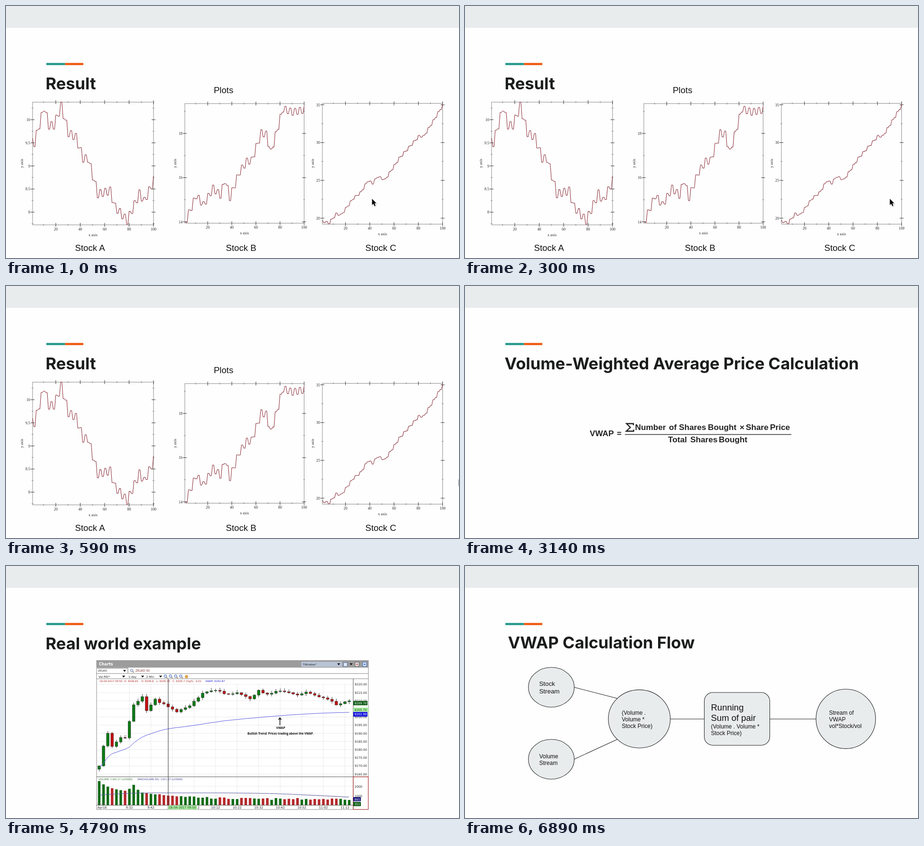
Animation of 955x532 px, one loop 8000 ms. Source, as an HTML page:

```html
<!DOCTYPE html>
<html lang="en">
<head>
<meta charset="utf-8">
<title>Stock slides</title>
<style>
  html, body { margin: 0; width: 100%; height: 100%; overflow: hidden; background: #fefefe; }
  svg { display: block; width: 955px; height: 532px; }
  .title { font: 700 34.5px Inter, sans-serif; fill: #1b1c1c; }
  .sans { font-family: "Liberation Sans", sans-serif; fill: #111; }
  .serif { font-family: "Liberation Serif", serif; fill: #222; }
  .ui { font-family: "DejaVu Sans", sans-serif; }
  .formula { font: 700 17.2px "Liberation Sans", sans-serif; fill: #222; }
  .note { font-family: "Open Sans", sans-serif; font-weight: 700; fill: #111; text-anchor: middle; }
</style>
</head>
<body>
<svg id="stage" viewBox="0 0 955 532"></svg>
<script>
const NS = "http://www.w3.org/2000/svg";
const stage = document.getElementById("stage");

function add(parent, tag, attrs, content) {
  const node = document.createElementNS(NS, tag);
  for (const key in attrs) node.setAttribute(key, attrs[key]);
  if (content !== undefined) node.textContent = content;
  parent.appendChild(node);
  return node;
}
const group = parent => add(parent, "g", {});
const rect = (g, x, y, width, height, fill, more) => add(g, "rect", { x, y, width, height, fill, ...more });
const path = (g, d, stroke, width = 1, more) =>
  add(g, "path", { d, fill: "none", stroke, "stroke-width": width, ...more });
const solid = (g, d, fill) => add(g, "path", { d, fill });
const text = (g, x, y, str, more) => add(g, "text", { x, y, ...more }, str);
const lines = (g, x, y, size, step, rows) =>
  rows.forEach((row, i) => text(g, x, y + i * step, row, { class: "sans", "font-size": size }));

// Straight interpolation through a few [position, value] keys.
const through = keys => v => {
  const i = Math.max(1, keys.findIndex(key => key[0] >= v));
  const [a, ya] = keys[i - 1], [b, yb] = keys[i];
  return ya + (yb - ya) * (v - a) / (b - a);
};

let seed = 7;
const random = () => (seed = seed * 16807 % 2147483647) / 2147483647;

function slide(title, x = 83.5, y = 176) {
  const g = group(stage);
  text(g, x, y, title, { class: "title" });
  return g;
}

rect(stage, 0, 0, 955, 532, "#fefefe");
rect(stage, 0, 0, 955, 46, "#e8ecec");
rect(stage, 85, 120.2, 39.5, 4.6, "#26998b");
rect(stage, 124.5, 120.2, 38.5, 4.6, "#ee5b11");

// ---------- three line plots ----------
// Trend plus an alternating ripple; each value is held for one x unit.
function plot(g, p) {
  const unit = (p.right - p.left) / 99;
  const px = v => p.left + (v - 1) * unit;
  const hTick = (y, r) => `M${p.left - r} ${y}h${2 * r}M${p.right - r} ${y}h${2 * r}`;
  const vTick = (x, r) => `M${x} ${p.top - r}v${2 * r}M${x} ${p.bottom - r}v${2 * r}`;
  const label = (x, y, str, anchor, more) =>
    text(g, x, y, str, { class: "serif", "font-size": 8, "text-anchor": anchor, ...more });
  let ticks = "", minor = "";

  for (let v = 10; v <= 100; v += 10) {
    if (v % 20) { minor += vTick(px(v), 2); continue; }
    ticks += vTick(px(v), 4);
    label(px(v), p.axisY - 12, v, "middle");
  }
  p.labels.forEach((str, i) => {
    const y = p.firstY + i * p.stepY;
    ticks += hTick(y, 4);
    label(p.left - 5, y + 3, str, "end");
  });
  for (let y = p.firstY - p.stepY / 2; y < p.bottom; y += p.stepY)
    if (y > p.top) minor += hTick(y, 2);

  rect(g, p.left, p.top, p.right - p.left, p.bottom - p.top, "none", { stroke: "#8a8a8a" });
  path(g, minor, "#777", 0.8);
  path(g, ticks, "#333", 1);

  const trend = through(p.trend);
  let d = "";
  for (let v = 1; v <= 100; v++) {
    const k = v >> 1;
    const y = trend(k) + (k % 2 ? p.ripple : -p.ripple);
    d += (d ? "L" : "M") + px(v) + " " + Math.min(p.bottom, Math.max(p.top, y));
  }
  path(g, d, "#8c2f3a", 1.05, { "stroke-linejoin": "round" });

  label((p.left + p.right) / 2, p.axisY, "x axis", "middle");
  label(0, 0, "y axis", "middle", { transform: `translate(${p.nameX} 332) rotate(-90)` });
  text(g, p.captionX, 517, p.caption, { class: "sans", "font-size": 18.6 });
}

const plots = slide("Result");
text(plots, 438, 184, "Plots", { class: "sans", "font-size": 18.5 });
plot(plots, {
  left: 56, right: 311, top: 203, bottom: 462, firstY: 240, stepY: 48.8,
  labels: ["10", "9.5", "9", "8.5", "8"],
  axisY: 485.5, nameX: 36, caption: "Stock A", captionX: 145.5, ripple: 8,
  trend: [[0, 287], [1, 289], [5, 214], [7, 252], [9, 252], [12, 211], [15, 268], [18, 277], [21, 322],
    [23, 322], [27, 397], [32, 390], [34, 424], [39, 453], [44, 396], [46, 412], [50, 367]]
});
plot(plots, {
  left: 377, right: 628.5, top: 206, bottom: 458.5, firstY: 269, stepY: 93.3,
  labels: ["18", "16", "14"],
  axisY: 481.5, nameX: 359, caption: "Stock B", captionX: 463.5, ripple: 7,
  trend: [[0, 462], [5, 400], [8, 420], [12, 385], [15, 399], [17, 368], [19, 404], [23, 350], [26, 328],
    [28, 326], [32, 268], [34, 271], [36, 309], [41, 217], [45, 224], [50, 219]]
});
plot(plots, {
  left: 667, right: 920.5, top: 205.5, bottom: 460.5, firstY: 208.5, stepY: 79.8,
  labels: ["35", "30", "25", "20"],
  axisY: 483.5, nameX: 649, caption: "Stock C", captionX: 757.5, ripple: 2,
  trend: [[0, 454], [3, 458], [6, 439], [8, 441], [13, 406], [16, 394], [19, 369], [21, 374], [23, 360],
    [26, 367], [32, 321], [40, 275], [42, 275], [46, 242], [50, 208]]
});

const cursor = group(plots);
const arrow = "M0 0V13.2L3 10.4L5.2 15.4L7.6 14.4L5.4 9.5H9.3Z";
path(cursor, arrow, "#bbb", 2, { transform: "translate(.8 1.2)", opacity: 0.5 });
path(cursor, arrow, "#fff", 2.2);
solid(cursor, arrow, "#0a0a0a");
const sliver = rect(plots, 953.6, 408, 4, 15, "#a5a5a5", { rx: 2 });

// ---------- formula ----------
const formula = slide("Volume-Weighted Average Price Calculation");
[["VWAP", 263, 317], ["=", 320, 317], ["Number", 358.5, 304], ["of", 430, 304], ["Shares", 451, 304],
  ["Bought", 512, 304], ["×", 579, 304], ["Share", 592, 304], ["Price", 643, 304],
  ["Total", 428, 330], ["Shares", 475, 330], ["Bought", 535, 330]
].forEach(([word, x, y]) => text(formula, x, y, word, { class: "formula" }));
path(formula, "M355 294V290.5H340.5L348.5 298.5L340 306.5H355.5V303", "#222", 2.4);
path(formula, "M337 313.5H688", "#333", 1.6);

// ---------- trading chart ----------
const market = slide("Real world example");
const ui = (x, y, str, size, fill = "#222", more) =>
  text(market, x, y, str, { class: "ui", "font-size": size, fill, ...more });
const caret = (x, y) => solid(market, `M${x - 3.2} ${y}h6.4l-3.2 4z`, "#111");

rect(market, 191, 199.5, 573, 314.5, "#fff", { stroke: "#888" });
rect(market, 191, 199.5, 573, 15, "#9c9c9c");
ui(196, 210, "Charts", 8, "#fff", { "font-weight": 700 });
rect(market, 622.5, 202, 86, 11, "#b7c3d3");
ui(626, 209.5, "TWindow*", 5.6);
rect(market, 711.5, 204, 8, 8, "#dfe8f5", { stroke: "#5a78b5" });
rect(market, 736, 203, 8, 9, "#f1f1f1", { stroke: "#555" });
path(market, "M738 207.5h4M740 205v5", "#b33", 1);
rect(market, 752, 203, 8, 9, "#dce8fa", { stroke: "#3b6cc0" });
path(market, "M754 207.5h4", "#3b6cc0", 2);
caret(701.5, 205.5);
caret(727.5, 205.5);

path(market, "M191 227H764M191 238H764", "#777", 0.9);
path(market, "M192 215.5H257V226", "#555", 0.9);
ui(194, 223, "ZELKO", 5.8);
ui(273, 223, "ZELKO 50", 6.2, "#7a2a2a");
ui(195, 235.5, "Vol-RSI*", 6);
ui(258, 235.5, "1-day", 6);
ui(295.5, 235.5, "2-Min", 6);
caret(250, 219.5);
[248, 288, 326].forEach(x => caret(x, 231.5));
function lens(x, y, color) {
  path(market, `M${x + 2} ${y + 2}l2.5 2.5`, "#a8702a", 1.4);
  add(market, "circle", { cx: x, cy: y, r: 2.8, fill: "#d9e7fb", stroke: color });
}
for (let i = 0; i < 4; i++) lens(336 + 10.8 * i, 232.5, "#3f62b0");
lens(265, 220.5, "#7a86a8");
add(market, "circle", { cx: 380.5, cy: 233.5, r: 3.6, fill: "#e0a850" });

[["18-04-2017 09:50", 197], ["O: 9206.65", 249], ["H: 9209.8", 285], ["L: 9205.45", 317],
  ["C: 9205.7", 351], ["Chg%: -0.01", 379], ["VWAP: 9192.87", 420]
].forEach(([str, x], i) => ui(x, 245.3, str, 5.4, i === 6 ? "#2222cc" : "#b02a2a"));

const barX = i => 196.5 + 9.088 * i;
const priceY = i => 250 + 17.2 * i;
let grid = "M191 465H732M191 485.5H732";
for (let i = 0; i < 12; i++) {
  grid += `M191 ${priceY(i)}H732`;
  ui(735, priceY(i) + 2.3, (9220 - 5 * i).toFixed(2), 6.3);
}
for (let i = 7; i < 59; i += 5) grid += `M${barX(i)} 249V505`;
path(market, grid, "#d4d4d4", 0.8, { "stroke-dasharray": "2 1.5" });

const price = through([[-1, 429], [0, 422], [1, 380], [2, 353], [3, 381], [5, 362], [6, 363], [8, 293],
  [10, 277], [11, 305], [13, 282], [18, 308], [21, 294], [24, 269], [27, 262], [30, 272], [32, 267],
  [35, 282], [37, 263], [39, 272], [41, 263], [46, 271], [48, 266], [53, 282], [55, 292], [58, 286]]);
const volume = i => 13 + 17 * Math.exp(-((i / 19) ** 2)) + 21 * Math.exp(-i / 2.5) + 15 * Math.exp(-((i - 8) ** 2));

// Every candle opens at the previous close; the blue line is the running weighted average.
let open = price(-1), weight = 15, total = 15 * 430, average = "";
for (let i = 0; i < 59; i++) {
  const x = barX(i), close = price(i) + (i > 8 ? 3 * random() - 1.5 : 0);
  const top = Math.min(open, close), size = Math.max(1.2, Math.abs(close - open));
  const fall = close > open;
  const amount = volume(i) + (i > 8 ? 4 * random() - 2 : 0);
  path(market, `M${x} ${top - 1 - 5 * random()}V${top + size + 1 + 4 * random()}`, "#444", 1);
  rect(market, x - 2.8, top, 5.6, size, fall ? "#c40f12" : "#0b7c14", { stroke: "#222", "stroke-width": 0.6 });
  rect(market, x - 2.7, 505 - amount, 5.4, amount, fall ? "#b5282b" : "#116b16");
  total += amount * (open + close) / 2;
  weight += amount;
  average += (i ? "L" : "M") + x + " " + total / weight;
  open = close;
}
path(market, average, "#5a5ae0", 1);
path(market, "M196 483.5Q260 479 310 479H450Q533 479.5 578 481T723 488", "#5a5a9c", 1);

path(market, "M191 445H764M191 505H732M732 238V514", "#555", 1);
path(market, "M342 238V514", "#333", 1);
rect(market, 732, 445, 31.5, 69, "none", { stroke: "#d04545" });
ui(195, 451.5, "VOLUME: 1163.17 (x10000)", 5.2, "#2c6a2c");
ui(277, 451.5, "SMA(VOLUME,50): 1321.07 (x10000)", 5.2, "#33338a");
ui(193, 503, "00.00", 5.2, "#666");
ui(735, 467.5, "2000", 6.3);
ui(735, 488, "1000", 6.3);

function tag(y, w, h, str, fill, ink = "#fff") {
  rect(market, 732, y, w, h, fill);
  ui(734.5, y + h / 2 + 2.3, str, 6.3, ink);
}
tag(285, 30, 9, "9209.70", "#0c5a14");
tag(299, 32, 8.5, "9205.70", "#a9eda0", "#234a20");
tag(308, 30, 10, "9202.99", "#1515d8");
tag(488, 16, 8.5, "865", "#10107a");
tag(498, 16, 9, "351", "#0c5a14");

// A label every ten minutes from 9:32, except under the highlighted time.
for (let i = 0; i < 11; i++) {
  if (i === 2 || i === 3) continue;
  const minutes = 9 * 60 + 32 + 10 * i;
  ui(barX(7 + 5 * i), 512, `${Math.floor(minutes / 60)}:${String(minutes % 60).padStart(2, "0")}`, 6.5,
    "#222", { "text-anchor": "middle" });
}
ui(193, 512, "Apr18", 6.4);
rect(market, 342, 505.5, 61, 8.5, "#a9eda0");
ui(343, 512, "18-04-2017 09:50", 6.4, "#234a20");
ui(404, 512, "2", 6.4);

path(market, "M577.5 336V321M574.5 324.5L577.5 320.5L580.5 324.5", "#111", 1.5);
text(market, 579, 344, "VWAP", { class: "note", "font-size": 6.6 });
text(market, 578.5, 356, "Bullish Trend: Prices trading above the VWAP.", { class: "note", "font-size": 6.2 });

// ---------- flow diagram ----------
const flow = slide("VWAP Calculation Flow", 90.5, 174);
path(flow, "M230 256L321 279.5M230 408L321 366M433 323H504.5M642.5 323H740", "#222", 1.1);
const shape = { fill: "#e8ecec", stroke: "#2b2b2b", "stroke-width": 1.1 };
[[182, 256, 48.3, 42], [182, 408, 48.3, 42], [367.5, 322.8, 65.3, 61.4], [802.8, 322.8, 62.8, 62.8]]
  .forEach(([cx, cy, rx, ry]) => add(flow, "ellipse", { cx, cy, rx, ry, ...shape }));
rect(flow, 504.5, 267, 138, 111.5, shape.fill, { rx: 18, ...shape });
lines(flow, 156.5, 253, 13.3, 16.3, ["Stock", "Stream"]);
lines(flow, 156.5, 406, 12, 14, ["Volume", "Stream"]);
lines(flow, 330.5, 314, 12, 14, ["(Volume .", "Volume *", "Stock Price)"]);
lines(flow, 518.5, 305, 18.5, 22, ["Running", "Sum of pair"]);
lines(flow, 518.5, 343, 12, 14, ["(Volume . Volume *", "Stock Price)"]);
lines(flow, 767.5, 314, 12, 14, ["Stream of", "VWAP", "vol*Stock/vol"]);

// ---------- timeline ----------
const LOOP = 8000;
const scenes = [[0, plots], [3140, formula], [4790, market], [6890, flow]];
const show = (node, on) => { node.style.display = on ? "" : "none"; };

function render(t) {
  scenes.forEach(([start, g], i) => {
    const end = i + 1 < scenes.length ? scenes[i + 1][0] : LOOP;
    show(g, t >= start && t < end);
  });
  const x = t < 300 ? 771.6 : t < 450 ? 895.6 : 954;
  cursor.setAttribute("transform", `translate(${x} 407)`);
  show(cursor, t < 590);
  show(sliver, t >= 590 && t < 1940);
}

const begin = performance.now();
function tick() {
  render((performance.now() - begin) % LOOP);
  requestAnimationFrame(tick);
}
render(0);
requestAnimationFrame(tick);
</script>
</body>
</html>
```
